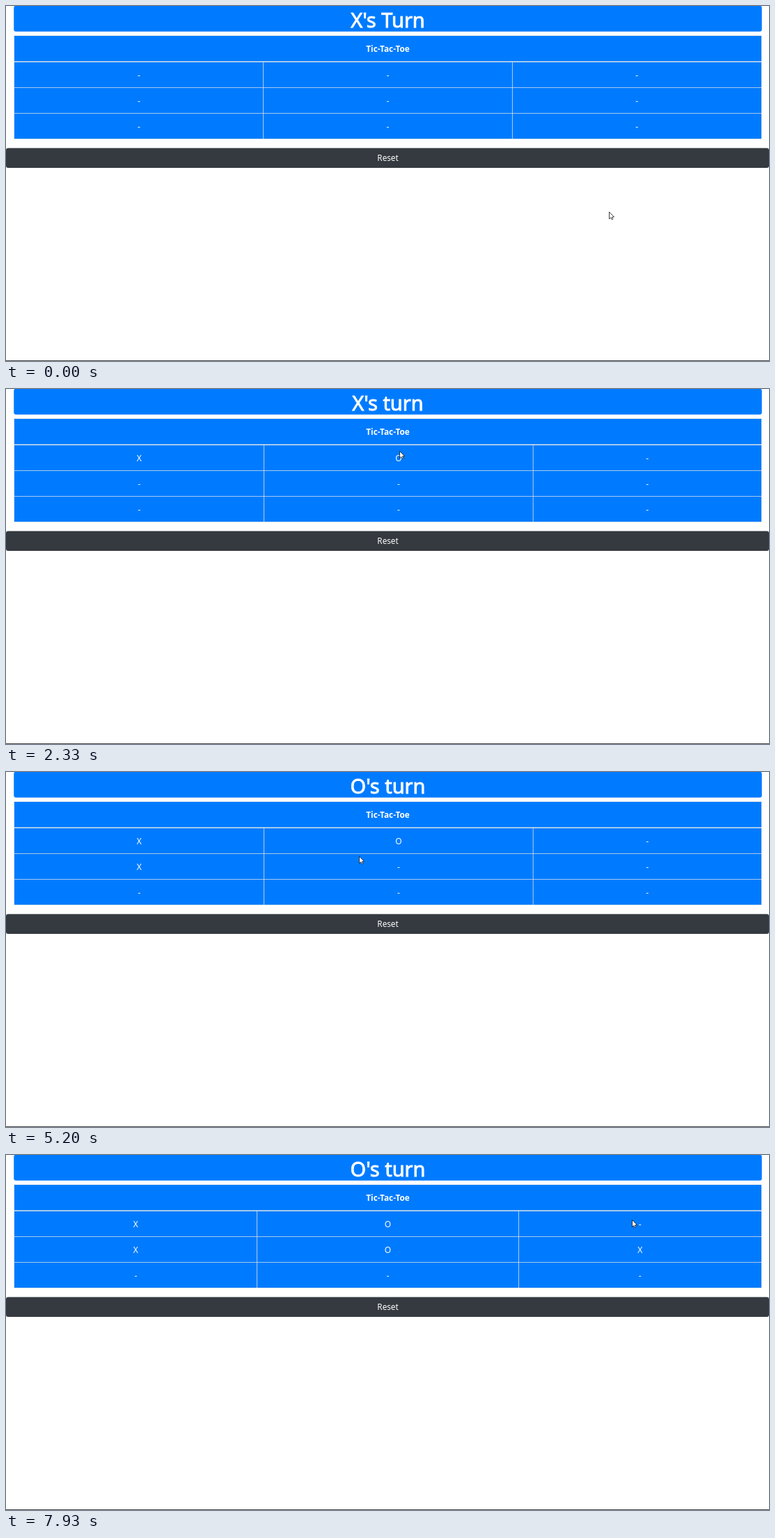
Write an HTML page with a canvas that moves like this. It is 1096 px wide and 511 px high and loops after 8000 ms.

```html
<!DOCTYPE html>
<html lang="en">
<head>
<meta charset="utf-8">
<title>Tic-Tac-Toe</title>
<style>
  html, body { margin: 0; width: 100%; height: 100%; overflow: hidden; background: #fff; }
  canvas { display: block; }
</style>
</head>
<body>
<canvas id="stage" width="1096" height="511"></canvas>
<script>
const ctx = document.getElementById('stage').getContext('2d');
const LOOP = 8000, TICKS_PER_MS = 15 / 1000;
const BLUE = '#007bff', LINE = '#dee2e6', DARK = '#343a40';
const FONT = '"Noto Sans", "Open Sans", sans-serif';
const LEFT = 12, RIGHT = 1085, WIDTH = RIGHT - LEFT, MIDDLE = 548.5;
const ROW = 36.75;

// Columns share the table width by their widest mark
const WEIGHT = { '-': 1, X: 1.094, O: 1.179 };

// X and O alternate, each move at a tick in a cell
const moves = [
  { tick: 17, cell: 0 },
  { tick: 35, cell: 1 },
  { tick: 62, cell: 3 },
  { tick: 85, cell: 4 },
  { tick: 106, cell: 5 }
];

// Pointer glides: ticks, destination, vertical bow of the path
const HOME = { x: 866, y: 296 };
const glides = [
  { from: 0, to: 14, x: 298, y: 100, bow: 0 },
  { from: 26, to: 31, x: 565, y: 89, bow: 36 },
  { from: 45, to: 54, x: 241, y: 137, bow: 22 },
  { from: 72, to: 78, x: 507, y: 121, bow: 0 },
  { from: 78, to: 83, x: 540, y: 130, bow: 0 },
  { from: 97, to: 98, x: 569, y: 135, bow: 0 },
  { from: 98, to: 101, x: 889, y: 133, bow: 13 },
  { from: 112, to: 116, x: 899, y: 100, bow: 0 },
  { from: 117, to: 119, x: 899, y: 93, bow: 0 }
];
const TEXT_CURSOR_TICK = 98;

const ease = k => k * k * (3 - 2 * k);

function pointerAt(tick) {
  let { x, y } = HOME;
  for (const g of glides) {
    if (tick <= g.from) break;
    const k = Math.min(1, (tick - g.from) / (g.to - g.from));
    x += (g.x - x) * ease(k);
    y += (g.y - y) * ease(k) + g.bow * Math.sin(Math.PI * k);
  }
  return [Math.round(x), Math.round(y)];
}

function boardAt(tick) {
  const cells = Array(9).fill('-');
  const played = moves.filter(m => m.tick <= tick);
  played.forEach((m, i) => { cells[m.cell] = 'XO'[i % 2]; });
  const player = 'XO'[played.length % 2];
  return { cells, heading: `${player}'s ${played.length ? 'turn' : 'Turn'}` };
}

function columnEdges(cells) {
  const weights = [0, 1, 2].map(c =>
    Math.max(...[0, 3, 6].map(r => WEIGHT[cells[r + c]])));
  const total = weights[0] + weights[1] + weights[2];
  const edges = [LEFT];
  for (const w of weights) edges.push(edges[edges.length - 1] + WIDTH * w / total);
  return edges;
}

function rect(color, x, y, w, h) {
  ctx.fillStyle = color;
  ctx.fillRect(x, y, w, h);
}

function panel(color, x, y, w, h) {
  ctx.fillStyle = color;
  ctx.beginPath();
  ctx.roundRect(x, y, w, h, 3);
  ctx.fill();
}

function label(text, x, y, size, weight = 400, outline = 0) {
  ctx.font = `${weight} ${size}px ${FONT}`;
  ctx.textAlign = 'center';
  ctx.fillStyle = ctx.strokeStyle = '#fff';
  ctx.fillText(text, x, y);
  if (outline) {
    ctx.lineWidth = outline;
    ctx.strokeText(text, x, y);
  }
}

function drawBoard({ cells, heading }) {
  panel(BLUE, 11.25, -0.3, 1074.5, 37);
  label(heading, MIDDLE, 30.5, 29, 400, 0.9);

  rect(LINE, LEFT - 0.75, 42.25, WIDTH + 1.5, 149.5);
  rect(BLUE, LEFT, 43, WIDTH, 148);
  label('Tic-Tac-Toe', MIDDLE, 66, 11.8, 700);

  const edges = columnEdges(cells);
  rect(LINE, LEFT, 79.5, WIDTH, 1.5);
  for (const row of [1, 2]) rect(LINE, LEFT, 80.5 + row * ROW, WIDTH, 0.75);
  for (const x of edges.slice(1, 3)) rect(LINE, x - 0.4, 81, 0.8, 110);

  cells.forEach((mark, i) => {
    const col = i % 3, row = Math.floor(i / 3);
    label(mark, (edges[col] + edges[col + 1]) / 2, Math.round(104 + row * ROW), 12);
  });
}

function drawArrow(x, y) {
  const points = [[0, 0], [0, 10], [2.3, 8], [3.8, 11], [5.3, 10.3], [4, 7.4], [7, 7.2]];
  ctx.beginPath();
  points.forEach(([dx, dy]) => ctx.lineTo(x + dx + 0.5, y + dy + 0.5));
  ctx.closePath();
  ctx.fillStyle = '#fff';
  ctx.fill();
  ctx.lineWidth = 0.8;
  ctx.strokeStyle = '#111';
  ctx.stroke();
}

function drawTextCursor(x, y) {
  const color = 'rgba(215, 165, 125, 0.5)';
  rect(color, x, y - 4, 1, 9);
  for (const dy of [-5, 5]) rect(color, x - 1, y + dy, 3, 1);
}

function draw(now) {
  // The small offset absorbs times rounded to 10 ms
  const tick = Math.floor((now % LOOP) * TICKS_PER_MS + 0.06);
  rect('#fff', 0, 0, 1096, 511);
  drawBoard(boardAt(tick));
  panel(DARK, 0, 204.5, 1096, 28.5);
  label('Reset', MIDDLE, 223, 11.7);
  rect('#4a4a4a', 0, 510, 1096, 1);

  const [x, y] = pointerAt(tick);
  if (tick === TEXT_CURSOR_TICK) drawTextCursor(x, y);
  else drawArrow(x, y);
}

const start = performance.now();
function loop() {
  draw(performance.now() - start);
  requestAnimationFrame(loop);
}
loop();
</script>
</body>
</html>
```
